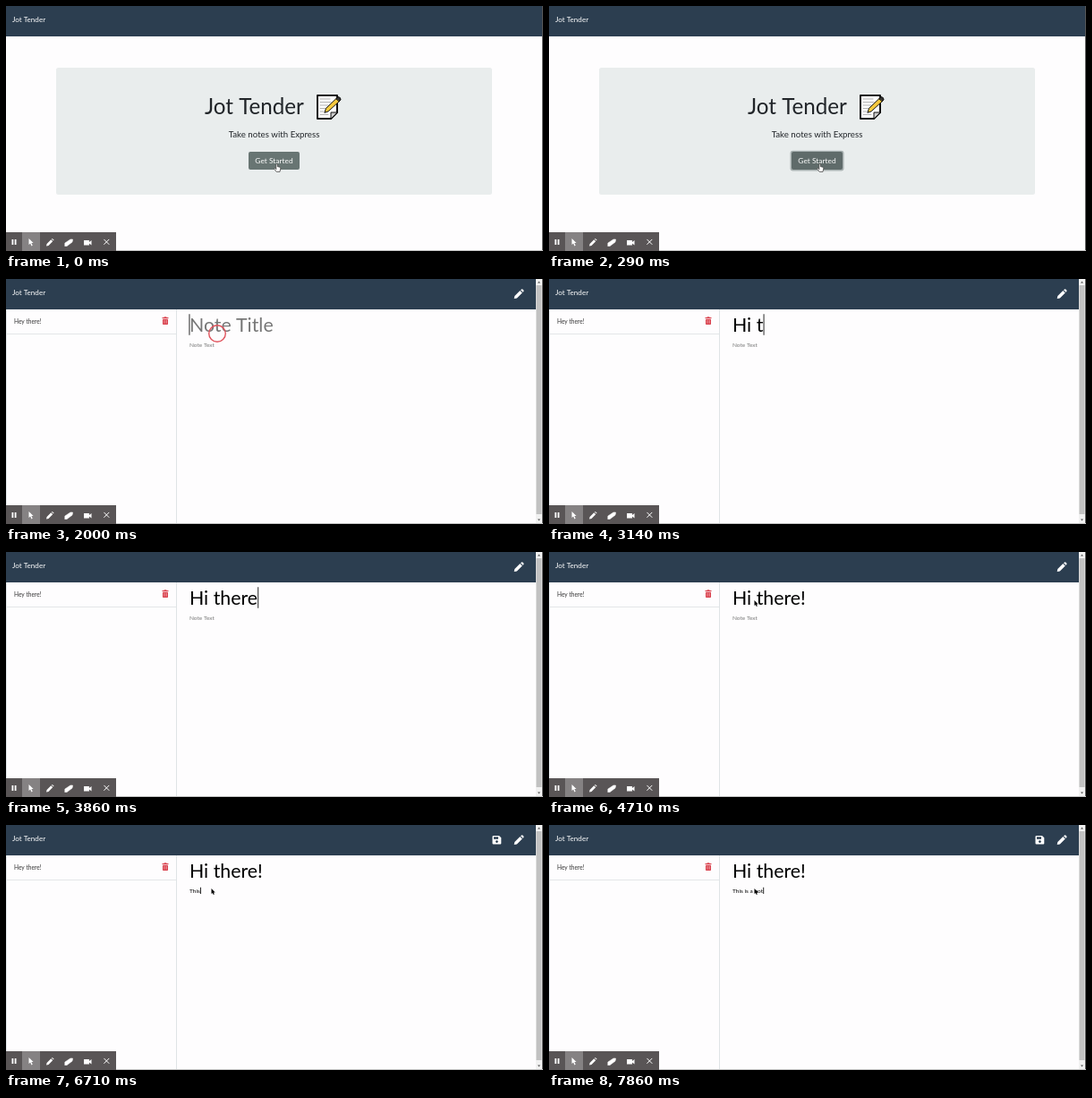
An HTML page with a canvas for the animation above (8000 ms loop, 600 px wide and 274 px high).

```html
<!DOCTYPE html>
<html lang="en">
<head>
<meta charset="utf-8">
<title>Jot Tender</title>
<style>
  html, body { margin: 0; width: 100%; height: 100%; overflow: hidden; background: #fefdfe; }
  canvas { display: block; }
</style>
</head>
<body>
<canvas id="stage" width="600" height="274"></canvas>
<script>
const ctx = document.getElementById('stage').getContext('2d');
const LOOP = 8000, FPS = 7;
const NAVY = '#2c3e50', PAPER = '#fefdfe';
const APP = 'Jot Tender', TITLE = 'Hi there!', BODY = 'This is a not';
const TITLE_KEYS = [18, 19, 20, 22, 23, 24, 25, 26, 28];   // ticks at which a title letter lands

function rect(x, y, w, h, color, radius = 0) {
  ctx.fillStyle = color;
  ctx.beginPath();
  ctx.roundRect(x, y, w, h, radius);
  ctx.fill();
}

function text(str, x, y, size, color, align = 'left') {
  ctx.font = `${size}px Lato, sans-serif`;
  ctx.fillStyle = color;
  ctx.textAlign = align;
  ctx.fillText(str, x, y);
  return ctx.measureText(str).width;
}

// Draws an SVG path with its origin at x, y.
function shape(d, x, y, fill, stroke, width = 1) {
  const path = new Path2D(d);
  ctx.save();
  ctx.translate(x, y);
  ctx.lineJoin = ctx.lineCap = 'round';
  if (fill) { ctx.fillStyle = fill; ctx.fill(path); }
  if (stroke) { ctx.strokeStyle = stroke; ctx.lineWidth = width; ctx.stroke(path); }
  ctx.restore();
}

function hand(x, y, outline) {
  shape('M-1.2 0V-4Q-.4 -5.2 .4 -4V-1.4L3 -.8Q4 -.4 3.8 .8L3 4.4H-.8L-3.4 1.2Q-3.4 .2 -2.4 .4L-1.2 1.4Z',
    x, y, '#fff', outline, .8);
}

function arrow(x, y) {
  shape('M0 0V6L1.3 4.9L2.3 7L3.3 6.5L2.4 4.5H4.2Z', x, y, '#000');
}

function navbar(width) {
  rect(0, 0, width, 34, NAVY);
  text(APP, 7, 18, 8.1, '#fff');
}

function memoIcon() {
  shape('M348 100H370V119L363 126H348Z', 0, 0, '#fff', '#111', 2);
  shape('M363 126V119H370Z', 0, 0, '#ccc', '#111', 1);
  shape('M351 104H362M351 107.5H363M351 111H360M351 114.5H357M351 118H355M351 121.5H360', 0, 0, null, '#aaa', .9);
  shape('M356 119L357.5 114.5L370 102.5L373.5 105.5L360.5 117.5Z', 0, 0, '#f7ca3e', '#111', 1);
  shape('M369 103.5L371 101.5Q374 102 374 104.5L372.5 106.5Z', 0, 0, '#333', '#111', 1);
}

function toolbar() {
  rect(0, 253, 123, 21, '#595556');
  rect(18, 253, 20, 21, '#858283');
  rect(6.5, 261, 1.8, 6, '#fff');
  rect(9.7, 261, 1.8, 6, '#fff');
  shape('M25.5 260V267L27.2 265.6L28.5 268.4L29.7 267.8L28.4 265.1H30.6Z', 0, 0, '#fff');
  shape('M45 268.5L45.6 266L50.3 261.3L52.2 263.2L47.5 267.9ZM51 260.6L51.8 259.9L53.6 261.7L52.9 262.5Z', 0, 0, '#fff');
  shape('M66 265L72 261H74.5L74 264L68 268.5H66Z', 0, 0, '#fff', '#fff', .6);
  shape('M87 262H93V264L95.5 262V267.5L93 265.5V267.5H87Z', 0, 0, '#fff');
  shape('M109.7 261.2L115 266.5M115 261.2L109.7 266.5', 0, 0, null, '#fff', 1);
}

function home(pressed) {
  navbar(599);
  rect(56, 69, 487, 142, '#e9eded', 2.5);
  text(APP, 222, 121, 24.2, '#212529');
  memoIcon();
  text('Take notes with Express', 299.5, 146.6, 9.7, '#212529', 'center');
  if (pressed) rect(269.5, 161.7, 60, 22.8, '#a9b2b2', 3);
  rect(271, 163, 57, 20, pressed ? '#5f6b6a' : '#687573', 2);
  text('Get Started', 299.5, 176, 8.4, '#fff', 'center');
  hand(303, 181, '#444');
}

function scrollbar() {
  rect(592, 0, 7, 273, '#f1f1f1');
  rect(592.5, 7, 6, 256, '#c1c1c1');
  shape('M594 4.5L595.5 2.5L597 4.5Z', 0, 0, '#555');
  shape('M594 268.5L595.5 270.5L597 268.5Z', 0, 0, '#555');
}

function noteList() {
  rect(0, 34, 1, 239, '#e3e7ea');
  rect(190, 34, 1, 239, '#dfe3e6');
  rect(0, 61, 190, 1, '#e3e6e8');
  text('Hey there!', 9, 50.3, 6.6, '#333');
  const red = '#d9414d';
  rect(174.5, 43, 7, 1.1, red);
  rect(176.6, 42.3, 2.8, 1, red);
  rect(175, 44.7, 6, 6.2, red, .7);
  for (const x of [176.4, 177.8, 179.2]) rect(x, 45.8, .5, 4, '#f3b9bd');
}

function headerIcons(canSave) {
  shape('M567.7 22L568.3 19L574.3 13L576.8 15.5L570.8 21.5ZM575 12.3L576 11.4Q576.7 11 577.3 11.6L578.3 12.6Q578.8 13.2 578.3 13.9L577.5 14.8Z',
    0, 0, '#fff');
  if (!canSave) return;
  shape('M544.5 12H551L553.3 14.3V20.5Q553.3 21.5 552.3 21.5H544.5Q543.5 21.5 543.5 20.5V13Q543.5 12 544.5 12Z', 0, 0, '#fff');
  rect(545, 13.3, 5, 2.5, NAVY);
  ctx.beginPath();
  ctx.arc(548.4, 18.6, 1.4, 0, 7);
  ctx.fill();
}

// Text field: shows its placeholder while empty, and a caret when focused.
function field(value, hint, y, size, caret) {
  const width = text(value || hint, 205, y, size, value ? '#000' : '#777');
  if (caret) rect(value ? 205.3 + width : 204.5, y - size * .9, .9, size * 1.1, '#111');
}

function click(x, y) {
  ctx.strokeStyle = '#e0525c';
  ctx.lineWidth = 1.4;
  ctx.beginPath();
  ctx.arc(x, y, 9.3, 0, 7);
  ctx.stroke();
}

function pointer(tick) {
  if (tick < 9) hand(303, 181, '#777');
  else if (tick === 14) click(236, 61);
  else if (tick < 18) arrow(236, 61);
  else if (tick < 30) return;
  else if (tick === 40) click(230, 72);
  else arrow(229.5, 54 + 17 * Math.min(1, Math.max(0, (tick - 33) / 4)));
}

function editor(tick) {
  const titleLength = TITLE_KEYS.filter(key => key <= tick).length;
  const bodyLength = Math.max(0, Math.floor((tick - 43) * 13 / 12));
  const titleCaret = tick >= 14 && tick < 40 && !(tick >= 32 && tick < 35);
  navbar(592);
  headerIcons(bodyLength > 0);
  noteList();
  scrollbar();
  field(TITLE.slice(0, titleLength), 'Note Title', 58.5, 21.3, titleCaret);
  field(BODY.slice(0, bodyLength), 'Note Text', 75.6, 6.5, tick >= 40);
  pointer(tick);
}

function draw() {
  const time = (performance.now() - start) % LOOP;
  const tick = Math.floor((time + 5) * FPS / 1000);
  rect(0, 0, 600, 274, PAPER);
  if (tick < 3) home(tick > 0);
  else editor(tick);
  rect(599, 0, 1, 274, '#555');
  rect(0, 273, 600, 1, '#c4c4c4');
  toolbar();
  requestAnimationFrame(draw);
}

const start = performance.now();
draw();
</script>
</body>
</html>
```
